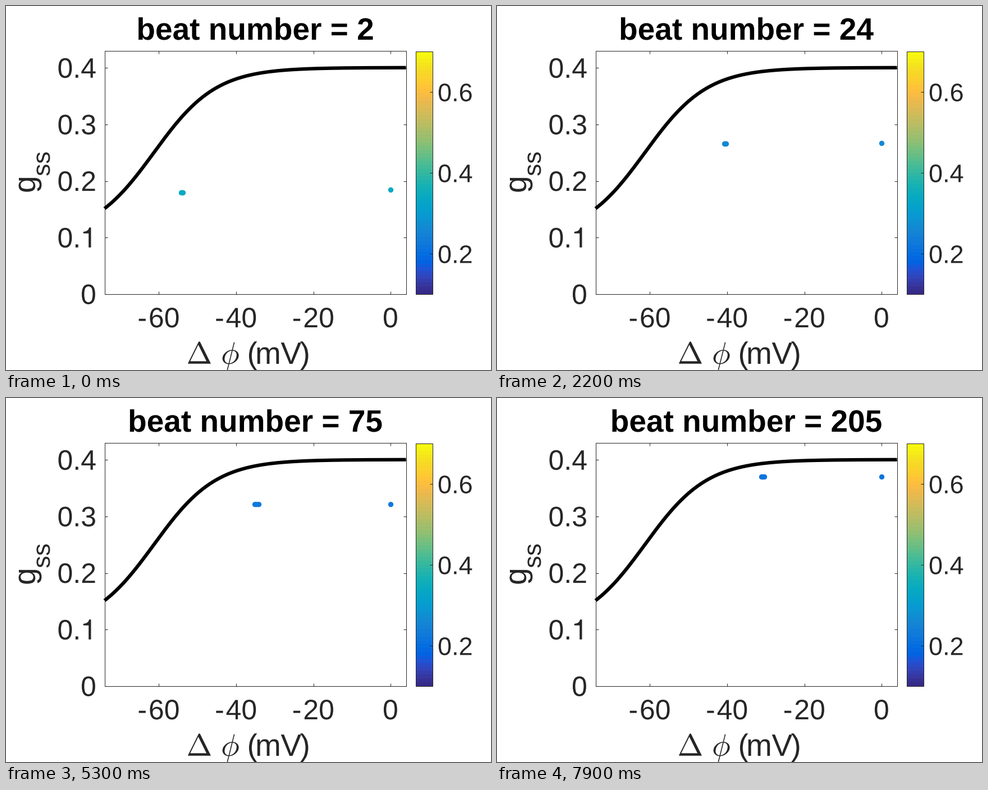
A matplotlib script that plays this animation: 864x648 px, repeating every 8000 ms.

```python
import numpy as np
import matplotlib.pyplot as plt
from matplotlib.animation import FuncAnimation
from matplotlib.colors import LinearSegmentedColormap
from matplotlib.patches import PathPatch
from matplotlib.path import Path
from matplotlib.textpath import TextPath
from matplotlib.transforms import Affine2D

W, H, DPI = 864, 648, 72          # 1 pt equals 1 px
FRAMES, INTERVAL = 80, 100
INK = "#262626"
FONT = {"family": "Liberation Sans", "math_fontfamily": "cm"}
BOLD = {**FONT, "weight": "bold"}
DIGIT = .556                      # digit advance in em

LEFT, RIGHT, TOP, BOTTOM = 175.5, 712.5, 79.5, 512.5
BAR_L, BAR_R, BAR_T = 729.5, 759.5, 80.5

# The digit one without a foot, in em units
ONE = [(.28, 0), (.28, .5), (.09, .5), (.09, .555), (.2, .58), (.265, .63),
       (.3, .71), (.365, .71), (.365, 0)]
ONE_BOLD = [(.25, 0), (.25, .475), (.04, .475), (.04, .58), (.14, .59),
            (.22, .625), (.27, .71), (.39, .71), (.39, 0)]

# Position in 0..63 with r, g, b
PARULA = [
    (0, .208, .166, .529), (2, .212, .214, .627), (4, .196, .265, .728),
    (6, .125, .324, .830), (7, .059, .360, .868), (8, .012, .388, .882),
    (10, .017, .427, .879), (13, .063, .474, .855), (16, .079, .520, .831),
    (18, .064, .557, .824), (20, .034, .597, .820), (22, .024, .629, .804),
    (25, .027, .664, .761), (28, .084, .693, .706), (32, .218, .725, .619),
    (36, .395, .746, .524), (40, .571, .749, .449), (44, .718, .741, .391),
    (48, .851, .730, .336), (51, .945, .726, .289), (53, .994, .746, .240),
    (55, .996, .786, .197), (58, .970, .848, .148), (60, .959, .895, .113),
    (63, .976, .983, .054)]
parula = LinearSegmentedColormap.from_list(
    "parula", [(p / 63, rgb) for p, *rgb in PARULA], N=64)


def px(v):
    return LEFT + (v + 74) / 78 * (RIGHT - LEFT)


def py(g):
    return BOTTOM - g * 1007


def bar_y(c):
    return BOTTOM - (c - .1) / .6 * (BOTTOM - BAR_T)


def glyphs(s, size, font=FONT):
    return TextPath((0, 0), s, size=size, prop=font)


def one(size, points):
    outline = np.array(points) * size
    return Path(np.vstack([outline, outline[:1]]), closed=True)


def shifted(path, x, y=0):
    return path.transformed(Affine2D().translate(x, y))


fig = plt.figure(figsize=(W / DPI, H / DPI), dpi=DPI, facecolor="white")
ax = fig.add_axes([0, 0, 1, 1])
ax.set_xlim(0, W)
ax.set_ylim(H, 0)
ax.axis("off")

texts, rules = [], []


def place(path, x, y, turn=0):
    texts.append(path.transformed(
        Affine2D().rotate_deg(turn).scale(1, -1).translate(x, y)))


def label(s, x, y, size, turn=0):
    place(glyphs(s, size), x, y, turn)


def rule(*points):
    rules.append(Path(np.floor(points) + .5))


def frame(x0, x1, y0, y1):
    rule((x0, y0), (x1, y0), (x1, y1), (x0, y1), (x0, y0))


# Axes, ticks and tick labels
frame(LEFT, RIGHT, TOP, BOTTOM)
for v in (-60, -40, -20, 0):
    x = px(v)
    rule((x, BOTTOM), (x, BOTTOM - 5))
    rule((x, TOP), (x, TOP + 5))
    if v:
        label("-", x - 37.5, 572, 50)
        label(str(-v), x - 18, 572, 50)
    else:
        label("0", x - 14, 572, 50)
for n in range(5):
    y = py(n / 10)
    rule((LEFT, y), (LEFT + 5, y))
    rule((RIGHT, y), (RIGHT - 5, y))
    if n == 0:
        label("0", 133, y + 18, 50)
    elif n == 1:
        label("0.", 91.5, y + 18, 50)
        place(one(50, ONE), 91.5 + (DIGIT + .278) * 50, y + 18)
    else:
        label(f"0.{n}", 91.5, y + 18, 50)

# Colour bar
edges = np.linspace(BOTTOM, BAR_T, 65)
ax.pcolormesh([BAR_L, BAR_R], edges, np.arange(64)[:, None], cmap=parula,
              vmin=0, vmax=63, zorder=1)
frame(BAR_L, BAR_R, BAR_T, BOTTOM)
for n in (2, 4, 6):
    y = bar_y(n / 10)
    rule((BAR_R - 5, y), (BAR_R, y))
    label(f"0.{n}", 769, y + 17, 45)

# Axis names
label("g", 52, 333, 55, turn=90)
label("ss", 78, 303, 44, turn=90)
label(r"$\Delta$", 321.5, 637, 55)
label(r"$\phi$", 383, 637, 55)
for ch, x in (("(", 429.5), ("m", 444), ("V", 489.5), (")", 523.5)):
    label(ch, x, 637, 55)

ax.add_patch(PathPatch(Path.make_compound_path(*texts), fc=INK, lw=0))
ax.add_patch(PathPatch(Path.make_compound_path(*rules), fill=False, ec=INK,
                       lw=1, capstyle="butt", zorder=3))

# Steady-state curve
volts = np.linspace(-74, 4, 200)
ax.plot(px(volts), py(.1 + .3 / (1 + np.exp(-(volts + 61.2) / 8.06))),
        color="black", lw=6.2, solid_capstyle="butt", zorder=4)

# Path of the dots, nearly straight in log(beat + 3)
BEATS = np.array([2, 11, 24, 33, 46, 110, 205])
NEAR = [311.5, 370.5, 404.5, 414.5, 427, 456, 471]
FAR = [314.5, 375.5, 408, 421.5, 434, 463, 476]
ROW = [331.5, 277.5, 244.5, 230, 213.5, 168.5, 139.5]
ROW_ZERO = [326.5, 276, 244, 229.3, 213, 168.5, 139.5]
SHADE = [25, 20.5, 17.5, 16, 14.5, 13, 12]

dots = ax.scatter([], [], s=88, lw=0, zorder=5)

# Title pieces, laid out once
SIZE = 55
HEAD = "beat number = "
head = glyphs(HEAD, SIZE, BOLD)
head_w = 7.141 * SIZE
digits = {d: one(SIZE, ONE_BOLD) if d == "1" else glyphs(d, SIZE, BOLD)
          for d in "0123456789"}
title = ax.add_patch(PathPatch(head, fc="black", lw=0))


def title_path(beat):
    step = DIGIT * SIZE
    number = str(beat)
    parts = [head] + [shifted(digits[d], head_w + i * step)
                      for i, d in enumerate(number)]
    x = (LEFT + RIGHT - head_w - len(number) * step) / 2
    flip = Affine2D().scale(1, -1).translate(x, 60)
    return Path.make_compound_path(*parts).transformed(flip)


def update(k):
    beat = k + 2 if k <= 48 else 50 + 5 * (k - 48)

    def at(values):
        return np.interp(np.log(beat + 3), np.log(BEATS + 3), values)

    xs = np.append(np.linspace(at(NEAR), at(FAR), 4), px(0))
    ys = np.append(np.full(4, at(ROW)), at(ROW_ZERO))
    dots.set_offsets(np.column_stack([xs, ys]) + (0, .3))
    dots.set_facecolor(parula(at(SHADE) / 63))
    title.set_path(title_path(beat))
    return dots, title


anim = FuncAnimation(fig, update, frames=FRAMES, interval=INTERVAL,
                     repeat=True, repeat_delay=0, blit=False)
plt.show()
```
